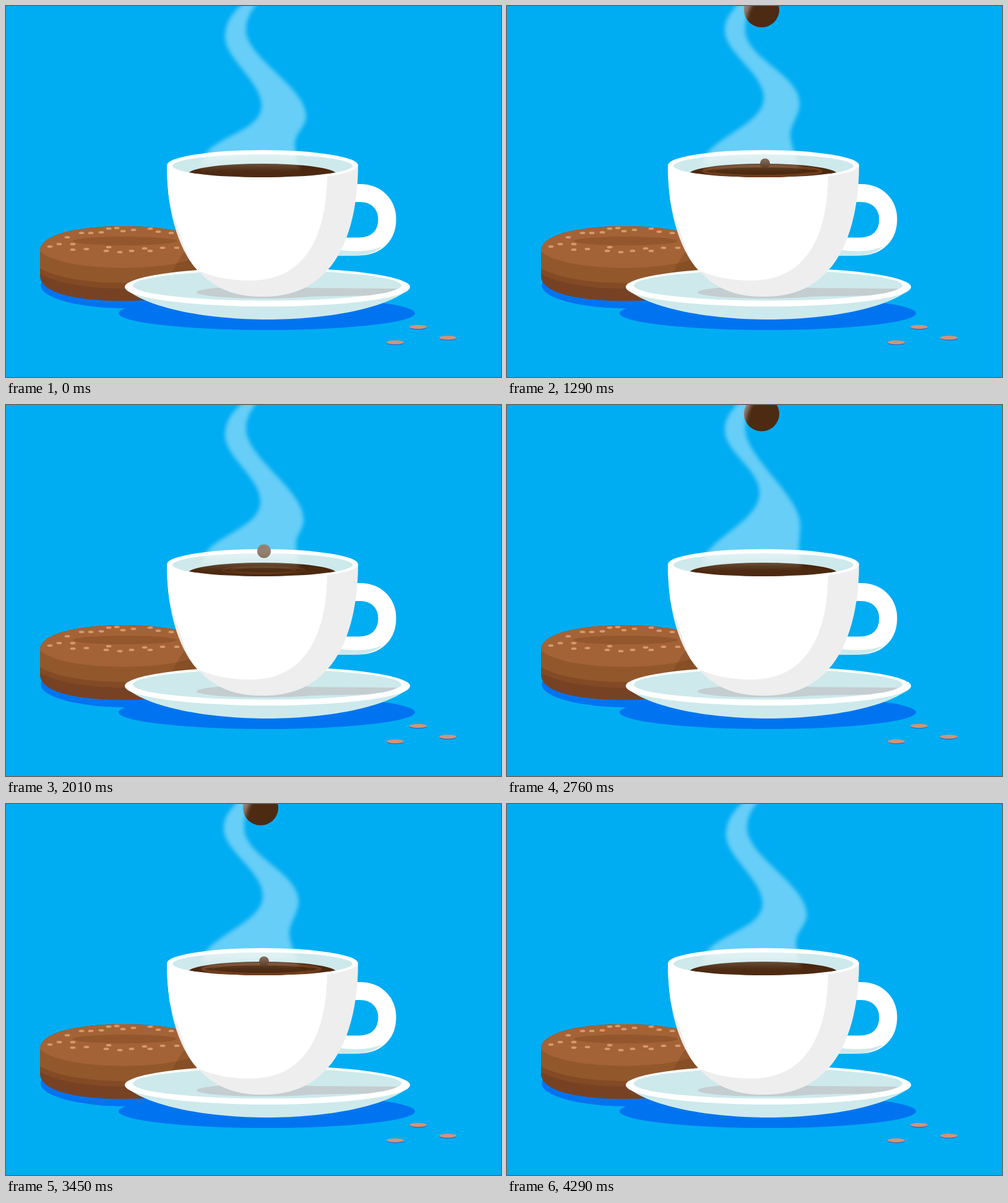
An HTML page with a canvas for the animation above (4.32 s loop, 800 by 600 pixels).

```html
<!DOCTYPE html>
<html lang="en">
<head>
<meta charset="utf-8">
<title>Coffee break</title>
<style>
html, body { margin: 0; width: 100%; height: 100%; overflow: hidden; background: #00adf2; }
canvas { display: block; }
</style>
</head>
<body>
<canvas id="stage" width="800" height="600"></canvas>
<script>
const ctx = document.getElementById('stage').getContext('2d');
const PERIOD = 2160, STEP = 30;
const COFFEE = '#4d2a12', GLAZE = '#cde9ec', SHADOW = '#0074f0';

// time, notch x y, bulge x y, neck x y, left bend x y, inner bend x y, top left x, top right x
const STEAM = [
  [0, 413, 161, 485, 178, 467, 222, 354, 50, 388, 38, 382, 405],
  [600, 408, 142, 474, 194, 472, 232, 352, 41, 385, 38, 372, 397],
  [840, 410, 158, 483, 182, 467, 222, 354, 49, 388, 38, 382, 405],
  [1290, 415, 148, 473, 158, 458, 208, 352, 40, 385, 38, 372, 397],
  [2010, 411, 156, 481, 185, 469, 224, 354, 49, 388, 38, 382, 405],
  [2160, 413, 161, 485, 178, 467, 222, 354, 50, 388, 38, 382, 405]
];

const SEEDS = [
  [99, 374], [122, 367], [137, 367], [154, 366], [166, 360], [179, 359],
  [189, 364], [206, 362], [233, 360], [246, 365], [267, 367], [71, 389],
  [86, 385], [108, 385], [108, 394], [130, 393], [166, 390], [162, 396],
  [184, 398], [203, 396], [224, 392], [233, 396], [253, 391], [276, 391]
];
const CRUMBS = [[666, 519], [714, 536.5], [629, 544]];

const donut = new Path2D('M55 396C55 366 130 356 190 356C250 356 325 366 325 396V440C325 466 250 477 190 477C120 477 55 466 55 436Z');
const cup = new Path2D('M260 257C260 340 282 402 315 433C345 463 380 470 414 470C449 470 484 463 514 433C547 402 569 340 569 257Z');
const cupLight = new Path2D('M519 270C519 365 488 444 395 444C360 444 330 438 300 423L240 250Z');
const handle = new Path2D('M555 302.5H572C600 302.5 616 322 616 345C616 370 600 389 570 389H535');
const handleShade = new Path2D('M535 394Q580 401 608 389Q592 404 560 404H535Z');
const saucer = new Path2D('M193 457C230 490 330 507 422 507C515 507 615 490 652 457Z');
const handleShadow = new Path2D('M480 456L632 457Q622 464 598 468L480 470Z');

function fill(path, color) {
  ctx.fillStyle = color;
  ctx.fill(path);
}

function oval(x, y, rx, ry) {
  const p = new Path2D();
  p.ellipse(x, y, rx, ry, 0, 0, Math.PI * 2);
  return p;
}

function clipped(path, draw) {
  ctx.save();
  ctx.clip(path);
  draw();
  ctx.restore();
}

const outerRim = oval(414.5, 257.5, 154.5, 24.5);
const innerRim = oval(414.5, 258.5, 145.5, 18.5);
const coffee = oval(414, 272, 120, 17);
const saucerWell = oval(422, 452, 217, 24.5);
const aboveCoffee = new Path2D();
aboveCoffee.rect(0, 0, 800, 265);

function drawDonut() {
  fill(oval(195, 452, 139, 37), SHADOW);
  fill(donut, '#774224');
  clipped(donut, () => {
    fill(oval(190, 415, 150, 42), '#834a25');
    fill(oval(190, 406, 150, 42), '#92582b');
    fill(oval(190, 389, 138, 34.5), '#a46336');
    fill(oval(192, 380, 84, 7), '#92572c');
    ctx.fillStyle = 'rgba(80,40,15,.18)';
    ctx.fill(new Path2D('M298 385Q280 405 268 432L330 440V385Z'));
  });
  SEEDS.forEach(([x, y]) => fill(oval(x, y, 4.5, 2), '#d49a6b'));
}

function drawSaucer() {
  fill(oval(421.5, 497, 239.5, 27), SHADOW);
  fill(saucer, GLAZE);
  fill(oval(422.5, 454.5, 230.5, 31.5), '#fff');
  fill(saucerWell, GLAZE);
  clipped(saucerWell, () => {
    fill(handleShadow, '#c4cdcf');
    fill(oval(416, 463, 108, 10), '#c4cdcf');
  });
}

function drawHandle() {
  ctx.strokeStyle = '#fff';
  ctx.lineWidth = 29;
  ctx.stroke(handle);
  fill(handleShade, GLAZE);
}

function drawBody() {
  fill(cup, '#eee');
  clipped(cup, () => fill(cupLight, '#fff'));
  fill(outerRim, '#fff');
  fill(innerRim, GLAZE);
}

function drawRipple(u) {
  if (u < 0.45 || u > 1.25) return;
  const rx = 67 + 187 * (u - 0.8);
  const grow = Math.min(1, Math.max(0, (u - 0.8) / 0.15));
  ctx.globalAlpha = Math.min(1, (1.25 - u) / 0.25);
  ctx.strokeStyle = '#6f3d1b';
  ctx.lineWidth = 1 + 3 * grow;
  if (rx > 4) ctx.stroke(oval(416 - 3 * grow, 267, rx, rx * 0.085));
  ctx.lineWidth = 1;
  if (rx > 20) ctx.stroke(oval(416 - 3 * grow, 267, rx - 15, (rx - 15) * 0.085));
  ctx.globalAlpha = 1;
}

function drawCoffee(splashes) {
  clipped(innerRim, () => {
    const g = ctx.createLinearGradient(0, 255, 0, 277);
    g.addColorStop(0, '#452409');
    g.addColorStop(1, '#4f2b13');
    fill(coffee, g);
    clipped(coffee, () => splashes.forEach(drawRipple));
  });
}

function drawDrop(t) {
  const age = t - 282;
  if (age < 0 || age > 870) return;
  const y = -30 + 44 * (age / 318) ** 2;
  const k = Math.min(1.5, Math.max(0, (t - 600) / 240));
  const r = 28.5 - 2 * k, up = 28.5 + 7 * k, x = 411.5;
  const side = r * (0.55 - 0.1 * k);
  const p = new Path2D();
  p.moveTo(x, y - up);
  p.bezierCurveTo(x + side, y - up, x + r, y - up * 0.5, x + r, y);
  p.bezierCurveTo(x + r, y + 15.7, x + r * 0.55, y + 28.5, x, y + 28.5);
  p.bezierCurveTo(x - r * 0.55, y + 28.5, x - r, y + 15.7, x - r, y);
  p.bezierCurveTo(x - r, y - up * 0.5, x - side, y - up, x, y - up);
  fill(p, COFFEE);
}

function drawDroplet(u) {
  if (u <= 0 || u >= 1) return;
  const s = 4 * u * (1 - u);
  fill(oval(417, 262 - 40 * s, 6.7 + 6.7 * s, 6.7 + 6.7 * s), COFFEE);
}

function steamPose(t) {
  const i = STEAM.findIndex(k => k[0] > t);
  const a = STEAM[i - 1], b = STEAM[i];
  let f = (t - a[0]) / (b[0] - a[0]);
  f = f * f * (3 - 2 * f);
  return a.slice(1).map((v, j) => v + (b[j + 1] - v) * f);
}

function drawSteam(t) {
  const [nx, ny, bx, by, kx, ky, lx, ly, ix, iy, tl, tr] = steamPose(t);
  const p = new Path2D();
  p.moveTo(tl + 16, -24);
  p.lineTo(tl, -4);
  p.bezierCurveTo(lx + 14, 10, lx, ly - 25, lx, ly);
  p.bezierCurveTo(lx, ly + 35, nx, ny - 38, nx, ny);
  p.bezierCurveTo(nx, ny + 40, 345, 208, 322, 240);
  p.lineTo(306, 275);
  p.lineTo(478, 275);
  p.bezierCurveTo(474, 255, kx, ky + 20, kx, ky);
  p.bezierCurveTo(kx, ky - 15, bx, by + 17, bx, by);
  p.bezierCurveTo(bx, by - 48, ix, iy + 47, ix, iy);
  p.bezierCurveTo(ix, iy - 18, tr - 8, 8, tr, -4);
  p.lineTo(tr + 16, -24);
  p.closePath();
  const g = ctx.createLinearGradient(0, 242, 0, 268);
  g.addColorStop(0, 'rgba(255,255,255,.4)');
  g.addColorStop(1, 'rgba(255,255,255,0)');
  ctx.save();
  ctx.filter = 'blur(3px)';
  fill(p, g);
  ctx.restore();
}

function render(t) {
  ctx.fillStyle = '#00adf2';
  ctx.fillRect(0, 0, 800, 600);
  drawDonut();
  drawSaucer();
  drawHandle();
  drawBody();
  const splashes = [1100, 1850].map(start => (t - start) / 200);
  drawCoffee(splashes);
  clipped(aboveCoffee, () => {
    drawDrop(t);
    drawDrop(t - 720);
    splashes.forEach(drawDroplet);
  });
  drawSteam(t);
  CRUMBS.forEach(([x, y]) => {
    fill(oval(x, y + 1, 14, 3.5), '#2469c8');
    fill(oval(x, y, 14, 3.2), '#cf9578');
  });
}

const start = performance.now();
function tick() {
  const t = performance.now() - start;
  render(Math.floor(t / STEP) * STEP % PERIOD);
  requestAnimationFrame(tick);
}
tick();
</script>
</body>
</html>
```
